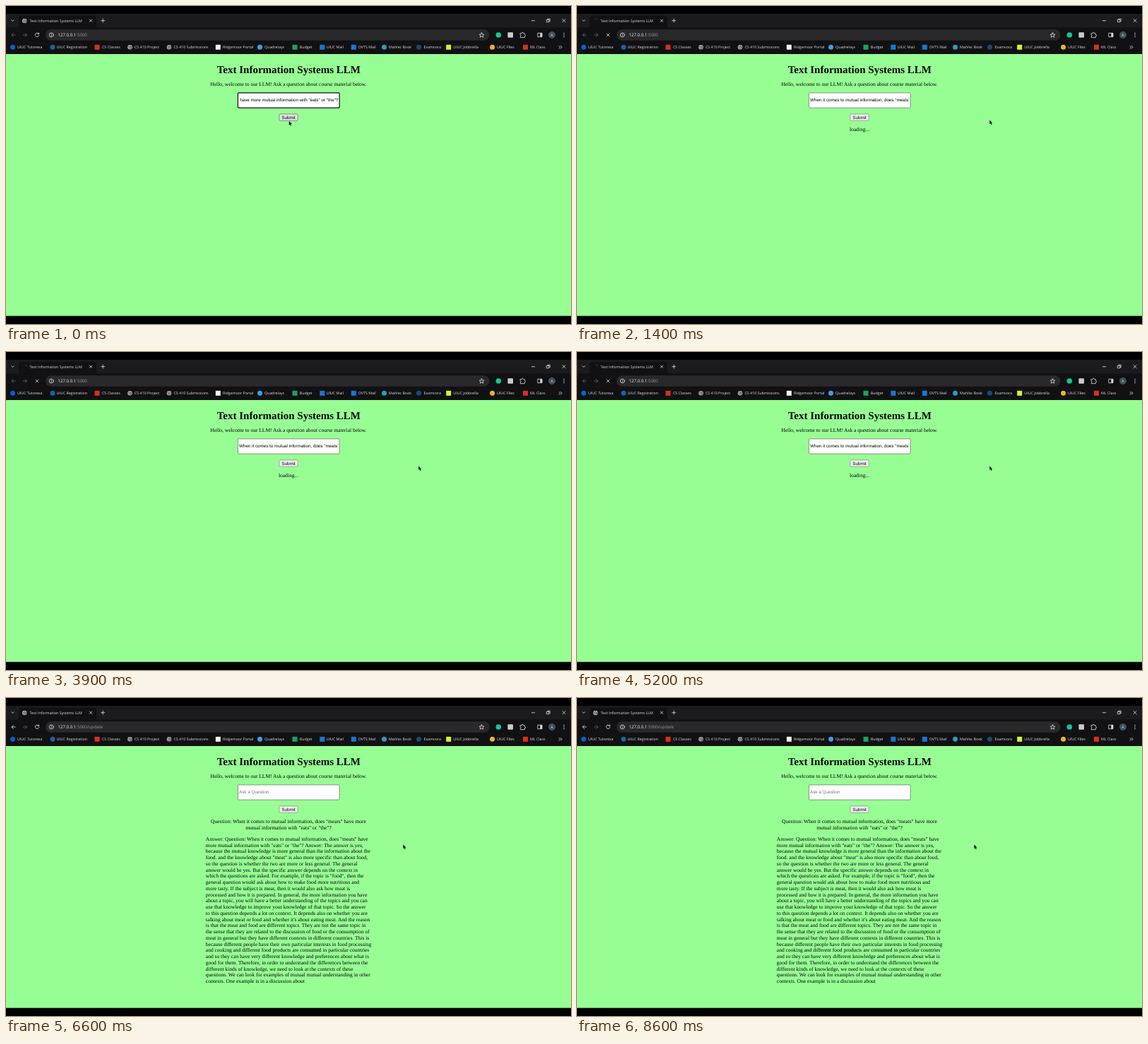
An HTML page for the animation above (8700 ms loop, 800x450 px).

```html
<!DOCTYPE html>
<html lang="en">
<head>
<meta charset="utf-8">
<title>Text Information Systems LLM</title>
<style>
  html, body { margin: 0; width: 100%; height: 100%; overflow: hidden; background: #000; }
  svg { display: block; width: 100vw; height: 100vh; }
  text { text-rendering: geometricPrecision; white-space: pre; }
  .ui { font-family: "Open Sans", "Noto Sans", sans-serif; font-size: 5.3px; fill: #dfe0e3; }
  .url { font-size: 6.1px; fill: #f0f0f2; }
  .dim { fill: #96989c; }
  .serif { font-family: "Liberation Serif", serif; font-size: 7.5px; }
  .form { font-family: "Liberation Sans", sans-serif; font-size: 6.25px; }
  .mid { text-anchor: middle; }
  .icon { fill: none; stroke: #d8d9dc; stroke-width: .85; stroke-linecap: round; stroke-linejoin: round; }
</style>
</head>
<body>
<svg id="stage" viewBox="0 0 800 450" preserveAspectRatio="none"></svg>
<script>
const LOOP = 8700, STEP = 100;
const SUBMIT_AT = 250, ANSWER_AT = 5300;

const text = (x, y, cls, str) => `<text x="${x}" y="${y}" class="${cls}">${str}</text>`;
const rect = (x, y, w, h, fill, extra = '') =>
  `<rect x="${x}" y="${y}" width="${w}" height="${h}" fill="${fill}" ${extra}/>`;
const disc = (x, y, r, fill) => `<circle cx="${x}" cy="${y}" r="${r}" fill="${fill}"/>`;
const icon = (d, extra = '') => `<path class="icon" d="${d}" ${extra}/>`;
const during = (states, content) => `<g data-states="${states}">${content}</g>`;
const globe = (x, y) => disc(x, y, 3.3, '#a9acb1') +
  `<path d="M${x - 2.4} ${y - 1}l1.6 1.3 .3 1.8M${x + .2} ${y - 2.4}l-.4 1.3 1.4 .8 1.4 -.5M${x + .9} ${y + 2.2}l.5 -1.3 1.2 -.2"
    fill="none" stroke="#303236" stroke-width=".8"/>`;

// Bookmarks: icon centre, label start, label, icon shape, icon colour
const bookmarks = [
  [9.5, 16, 'UIUC Tutorexa', 'disc', '#0a5fd0'],
  [66, 71.5, 'UIUC Registration', 'disc', '#1765a8'],
  [129, 136, 'CS Classes', 'square', '#d9301c'],
  [175.5, 182, 'CS 410 Project', 'globe'],
  [231, 237.5, 'CS 410 Submissions', 'globe'],
  [300.3, 307, 'Ridgemoor Portal', 'square', '#f1f1f1'],
  [359.5, 366, 'Quadrelays', 'disc', '#3e9fe8'],
  [409, 415.8, 'Budget', 'square', '#17a65a'],
  [447.8, 453.7, 'UIUC Mail', 'square', '#1678cf'],
  [492.3, 498.8, 'OVTS Mail', 'square', '#1678cf'],
  [535.5, 542, 'MatVec Book', 'disc', '#2c9ac6'],
  [584.5, 591.5, 'Examvora', 'disc', '#194a75'],
  [626.7, 633.3, 'UIUC Jobbrella', 'square', '#d5f52b'],
  [688.6, 695, 'UIUC Files', 'disc', '#e7b52b'],
  [735.5, 742, 'ML Class', 'square', '#d9301c'],
];

const bookmark = ([x, labelX, label, shape, color]) => {
  const mark = shape === 'globe' ? globe(x, 58.3)
    : shape === 'disc' ? disc(x, 58.3, 3.5, color)
    : rect(x - 3.5, 54.8, 7, 7, color);
  return mark + text(labelX, 60.2, 'ui', label);
};

const question = ['Question: When it comes to mutual information, does "meats" have more',
  'mutual information with "eats" or "the"?'];

const answer = `Answer: Question: When it comes to mutual information, does "meats" have
more mutual information with "eats" or "the"? Answer: The answer is yes,
because the mutual knowledge is more general than the information about the
food. and the knowledge about "meat" is also more specific than about food,
so the question is whether the two are more or less general. The general
answer would be yes. But the specific answer depends on the context in
which the questions are asked. For example, if the topic is "food", then the
general question would ask about how to make food more nutritious and
more tasty. If the subject is meat, then it would also ask how meat is
processed and how it is prepared. In general, the more information you have
about a topic, you will have a better understanding of the topics and you can
use that knowledge to improve your knowledge of that topic. So the answer
to this question depends a lot on context. It depends also on whether you are
talking about meat or food and whether it's about eating meat. And the reason
is that the meat and food are different topics. They are not the same topic in
the sense that they are related to the discussion of food or the consumption of
meat in general but they have different contexts in different countries. This is
because different people have their own particular interests in food processing
and cooking and different food products are consumed in particular countries
and so they can have very different knowledge and preferences about what is
good for them. Therefore, in order to understand the differences between the
different kinds of knowledge, we need to look at the contexts of these
questions. We can look for examples of mutual mutual understanding in other
contexts. One example is in a discussion about`.split('\n');

const lines = (rows, x, y, cls) => rows.map((row, i) => text(x, y + i * 8.75, cls, row)).join('');

const tabStrip = rect(0, 11, 800, 20, '#1b1b1d') +
  `<path d="M15 31q3 0 3 -3v-10q0 -4 4 -4h102q4 0 4 4v10q0 3 3 3z" fill="#111113"/>` +
  icon('M7.8 19.8l1.7 1.7 1.7 -1.7') +
  during('ask answered', globe(26.2, 21)) +
  during('loading', `<path id="spinner" d="M26.2 17.5a3.5 3.5 0 0 1 3.5 3.5" class="icon" style="stroke:#35373b"/>`) +
  text(33.5, 22.8, 'ui', 'Text Information Systems LLM') +
  icon('M118.3 19l3.4 3.4m0 -3.4l-3.4 3.4') +
  icon('M137.2 18.2v5m-2.5 -2.5h5') +
  icon('M744.3 20.8h4.4') +
  icon('M765.7 19.4h3.3v3.3h-3.3zM766.9 19.2v-1h3.3v3.4h-1') +
  icon('M787.9 18.5l4.2 4.2m0 -4.2l-4.2 4.2');

const backArrow = 'M13.2 41h-5.2m2.4 -2.5l-2.4 2.5 2.4 2.5';
const toolbar = rect(0, 30.5, 800, 37.5, '#111113') +
  during('ask loading', icon(backArrow, 'style="stroke:#606166"')) +
  during('answered', icon(backArrow)) +
  icon('M24.3 41h5.2m-2.4 -2.5l2.4 2.5 -2.4 2.5', 'style="stroke:#606166"') +
  during('ask answered', icon('M46.3 39.3a2.7 2.7 0 1 0 .4 2.2M46.6 38v1.8h-1.8')) +
  during('loading', icon('M42 39l4 4m0 -4l-4 4')) +
  rect(56, 33.3, 628.5, 15.4, '#29292c', 'rx="7.7"') +
  `<circle class="icon" cx="64.3" cy="41" r="3"/>` + icon('M64.3 40.8v1.6m0 -2.9v.1') +
  `<text x="73.5" y="43.2" class="ui url">127.0.0.1<tspan class="dim">:5000</tspan>` +
  `<tspan class="dim" data-states="answered">/update</tspan></text>` +
  icon('M673.5 37.8l1 2.2 2.4 .2 -1.8 1.6 .6 2.4 -2.2 -1.3 -2.2 1.3 .6 -2.4 -1.8 -1.6 2.4 -.2z') +
  disc(697.3, 41, 3.8, '#15c39a') +
  rect(710.4, 37.2, 7.6, 7.6, '#c9cacc', 'rx="1"') +
  icon('M728.3 38.7h2v-.4a1 1 0 0 1 2 0v.4h2v2h.3a1 1 0 0 1 0 2h-.3v2h-6v-1.8a1.2 1.2 0 0 0 0 -2.3z') +
  icon('M753.2 38.3h5.8v5.4h-5.8z') + rect(756.3, 38.3, 2.7, 5.4, '#d8d9dc') +
  disc(773, 41, 5, '#3e5361') + text(773, 42.8, 'ui mid', 'A') +
  [38.4, 41, 43.6].map(y => disc(790, y, .75, '#d8d9dc')).join('') +
  bookmarks.map(bookmark).join('') +
  icon('M783 56.5l1.7 1.8 -1.7 1.8m2.5 -3.6l1.7 1.8 -1.7 1.8');

const inputBox = (stroke, width) =>
  rect(328.4, 122.9, 143.7, 21.2, '#fff', `rx="1" stroke="${stroke}" stroke-width="${width}"`);
const button = (fill, stroke) =>
  rect(386.8, 152.9, 26.4, 9.4, fill, `rx="1.4" stroke="${stroke}" stroke-width=".6"`);

const page = rect(0, 68, 800, 370.6, '#97fe94') +
  `<text x="400.3" y="95.2" class="serif mid" style="font-size:15px;font-weight:bold">Text Information Systems LLM</text>` +
  text(400, 113.3, 'serif mid', 'Hello, welcome to our LLM! Ask a question about course material below.') +
  during('ask', inputBox('#101010', 1.2) + button('#e3e3e3', '#555') +
    text(331.2, 135.3, 'form', 'have more mutual information with "eats" or "the"?')) +
  during('loading', inputBox('#767676', .8) + button('#efefef', '#767676') +
    `<g clip-path="url(#field)">${text(330, 135.3, 'form', 'When it comes to mutual information, does "meats" have')}</g>` +
    text(400, 176.9, 'serif mid', 'loading...')) +
  during('answered', inputBox('#767676', .8) + button('#efefef', '#767676') +
    `<g opacity=".54">${text(330, 135.3, 'form', 'Ask a Question')}</g>` +
    lines(question, 400, 176.9, 'serif mid') + lines(answer, 282.8, 201.9, 'serif')) +
  text(400, 159.8, 'form mid', 'Submit');

const stage = document.getElementById('stage');
stage.innerHTML = `<clipPath id="field"><rect x="329" y="123" width="141.4" height="21"/></clipPath>` +
  tabStrip + toolbar + page +
  `<path id="cursor" d="M0 0v5.7l1.3 -1.2 1 2.1 1 -.5 -1 -2h1.8z"/>`;

const cursor = document.getElementById('cursor');
const spinner = document.getElementById('spinner');
const stateful = [...stage.querySelectorAll('[data-states]')];

const ease = (t, start, end) => {
  const p = Math.min(1, Math.max(0, (t - start) / (end - start)));
  return p * p * (3 - 2 * p);
};

function draw(now) {
  const t = Math.floor(now % LOOP / STEP) * STEP;
  const state = t < SUBMIT_AT ? 'ask' : t < ANSWER_AT ? 'loading' : 'answered';
  for (const el of stateful)
    el.style.display = el.dataset.states.split(' ').includes(state) ? '' : 'none';

  const away = ease(t, 300, 800), back = ease(t, 5200, 5500);
  const x = 400.8 + 183.4 * away - 21.8 * back;
  const y = 163 - 1.6 * away + 46.2 * back;
  cursor.setAttribute('transform', `translate(${x} ${y})`);
  spinner.setAttribute('transform', `rotate(${-t * 360 / 1300} 26.2 21)`);
  requestAnimationFrame(draw);
}
requestAnimationFrame(draw);
</script>
</body>
</html>
```
